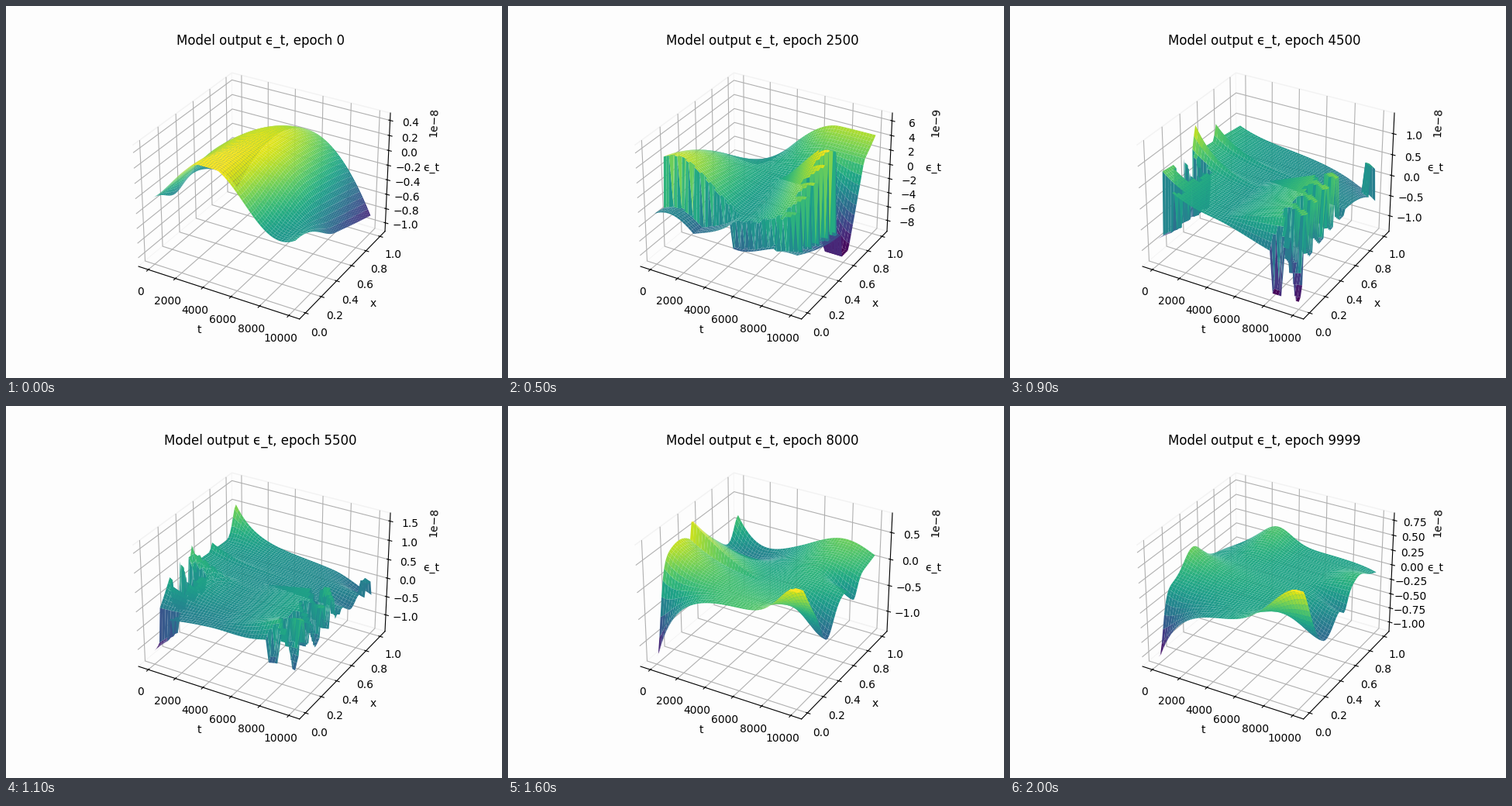
A matplotlib script that plays this animation: 640 px wide and 480 px high, repeating every 2.1 s.

```python
import numpy as np
import matplotlib.pyplot as plt
from matplotlib.animation import FuncAnimation

FRAMES, STEP_MS = 21, 100
BACK = "#fdfdfd"
PAD = 0.0729  # axis margin as a share of the data range

t, x = np.meshgrid(np.linspace(0, 1, 51), np.linspace(0, 1, 51))


def bump(a, centre, width):
    return np.exp(-((a - centre) / width) ** 2)


def decay(a, length):
    return np.exp(-a / length)


def ramp(a, start, end):
    return np.clip((a - start) / (end - start), 0, 1)


def ease(a, start, end):
    f = ramp(a, start, end)
    return f * f * (3 - 2 * f)


def past(a, edge, b, teeth=24, depth=0.03):
    """True where a lies beyond a toothed edge running along b."""
    return a > edge + depth * ((b * teeth) % 1)


def stripes(period, slant=0.0, share=0.5):
    return ((x + slant * t) / period) % 1 < share


# Each shape gives the surface on a scale from -1 to 1.

def arch():
    front = 0.55 + 0.5 * np.cos(2 * np.pi * (t - 0.4))
    top = 0.45 + 0.07 * x**4
    dome = 0.97 - 0.42 * x**4 - (3.4 + 2.4 * x) * (t - top) ** 2
    w = ease(x, 0, 0.5)
    return front + (dome - front) * w - 0.28 * bump(x, 0.25, 0.15) * decay(t, 0.12)


def split():
    z = (0.3 - 1.15 * x**1.3) * ramp(t, 0.6, 0)
    z += 0.4 * bump(x, 0.75, 0.25) * bump(t, 0.5, 0.18)
    z -= 0.22 * (1 - x) * bump(t, 0.7, 0.2)
    z += (0.14 + 0.9 * x) * t**6
    z -= 0.8 * ramp(t, 0.3, 0) * ~past(x, 0.12, t)
    z += 1.25 * ramp(t, 0.5, 0) * past(x, 0.6, t, 22, 0.04)
    z -= (0.45 + 1.95 * x) * (past(t, 0.945, x, 20) & (x < 0.67))
    return z


def saddle():
    near = x < 0.575
    z = (0.95 - 1.3 * x**1.6) * bump(t, 0.1, 0.33) - 0.08
    z += 0.85 * ease(t, 0.1, 0.75) * x**2.5
    z -= 0.95 * ramp(t, 0.55, 0.28) * ~past(x, 0.10, t, 14)
    ridge = (0.45 + 0.9 * x) * ease(t, 0.5, 0.95)
    edge = (0.5 + 2.0 * x) * past(t, 0.85, x, 9, 0.13)
    pit = 2 * ramp(x, 0.85, 0.55) * ease(t, 0.7, 1)
    z += np.where(near, ridge - edge, -pit)
    z -= 0.45 * ((t > 0.55) & (t < 0.85) & ~past(x, 0.02, t, 20, 0.05))
    return z


def shards():
    z = (0.55 - 0.3 * x) * decay(t, 0.22)
    z -= 0.3 * (1 - x) ** 2 * ease(t, 0.4, 1) + 0.5 * x**5 * t**4
    z += 0.5 * bump(x, 0.46, 0.03) * decay(t, 0.15)
    z += 0.3 * bump(x, 0.7, 0.02) * decay(t, 0.2)
    gap = (x < 0.08) | ((x > 0.19) & (x < 0.41) & stripes(0.11, 0.7, 0.75))
    z -= 1.2 * decay(t, 0.25) * (gap & ~past(t, 0.10, x, 15, 0.06))
    near = x < 0.58
    z += 0.75 * ramp(t, 0.45, 1) * ramp(x, 0, 0.08) * near
    z -= 0.85 * (past(t, 0.8, x, 13, 0.06) & near & stripes(0.13, 0.8))
    z += 0.6 * ((t > 0.95) & (x > 0.9) & (x < 0.99))
    return z


def horns():
    z = -0.07 - 1.05 * decay(t, 0.25) * bump(x, 0, 0.15 + 0.3 * t)
    z += 0.5 * bump(x, 0.28, 0.1 + 0.2 * t) * decay(t, 0.2)
    z += 1.15 * decay(t, 0.14) * bump(x, 1, 0.06 + 0.4 * t)
    z += 0.5 * bump(x, 0.03, 0.13) * bump(t, 0.93, 0.2)
    wave = 1 + np.cos(2 * np.pi * (x - 0.24) / 0.235)
    z -= 0.17 * wave * ease(t, 0.72, 1) * ramp(x, 0.1, 0.2)
    z += 0.2 * ramp(t, 0.35, 0) * (stripes(0.05, 0.9) & (x > 0.36) & (x < 0.52))
    z += 0.25 * (past(t, 0.88, x, 13, 0.06) & (x > 0.43) & (x < 0.55))
    return z


def corners(pull, lift, spread):
    """Sink at the near left corner, peak at the near right one."""
    return (lift * bump(t, 1, spread) * bump(x, 0, 0.14)
            - pull * decay(t, 0.15) * bump(x, 0, 0.08 + 0.3 * t))


def cliff():
    z = 0.1 + 0.33 * bump(x, 0, 0.3) + corners(1.65, 0.65, 0.17)
    z += 0.62 * bump(x, 0.33, 0.26) * decay(t, 0.3)
    z += 0.4 * ramp(t, 0.5, 0) * ramp(x, 1.1, 0.4) * (x > 0.43)
    z += 0.5 * bump(x, 1, 0.08) * decay(t, 0.13)
    z -= 0.35 * bump(x, 0.92, 0.18) * bump(t, 0.15, 0.25)
    z += 0.45 * bump(t, 0.8, 0.3) * x**2
    rim = 0.6 * bump(x, 0.37, 0.11) + 0.35 * bump(x, 0.72, 0.06)
    return z - rim * ease(t, 0.72, 1)


def calm():
    z = 0.16 + corners(1.25, 0.9, 0.26)
    z += 0.4 * bump(x, 0.42, 0.14) * decay(t, 0.2)
    z -= 0.3 * x**4 * decay(t, 0.12)
    z += 0.3 * bump(t, 0.28, 0.15) * bump(x, 1, 0.25)
    rim = 0.48 * bump(x, 0.33, 0.16) + 0.25 * bump(x, 0.57, 0.05)
    rim -= 0.17 * bump(x, 0.76, 0.12)
    return z - rim * ease(t, 0.72, 1) - 0.1 * x**8 * t**8


# epoch, z limits in units of 1e-9, surface
KEYS = [
    (0, -11.2, 4.97, arch()),
    (1000, -7.4, 7.55, split()),
    (2500, -9.58, 7.05, saddle()),
    (4500, -13.9, 14.87, shards()),
    (6500, -15.2, 19.3, horns()),
    (8000, -13.95, 8.6, cliff()),
    (9999, -11.65, 8.7, calm()),
]


def state(epoch):
    """Blend the two neighbouring keys: z limits and surface."""
    a, b = next(p for p in zip(KEYS, KEYS[1:]) if epoch <= p[1][0])
    f = (epoch - a[0]) / (b[0] - a[0])
    lo, hi, z = (p + (q - p) * f for p, q in zip(a[1:], b[1:]))
    return lo * 1e-9, hi * 1e-9, np.clip(z, -1, 1)


fig = plt.figure(figsize=(6.4, 4.8), dpi=100, facecolor=BACK)
ax = fig.add_subplot(projection="3d", facecolor=BACK)
for axis in (ax.xaxis, ax.yaxis, ax.zaxis):
    axis.pane.set_alpha(1)
    axis.pane.set_facecolor(BACK)
    axis.pane.set_edgecolor("#f2f2f2")
ax.set_xlabel("t")
ax.set_ylabel("x")
ax.set_zlabel("ϵ_t")


def draw(i):
    epoch = min(500 * i, 9999)
    lo, hi, z = state(epoch)
    mid, half = (lo + hi) / 2, (hi - lo) / 2 / (1 + 2 * PAD)
    for surf in list(ax.collections):
        surf.remove()
    ax.plot_surface(t * 10000, x, mid + half * z, cmap="viridis",
                    vmin=mid - half, vmax=mid + half, rstride=1, cstride=1)
    ax.set_xlim(-PAD * 10000, (1 + PAD) * 10000)
    ax.set_ylim(-PAD, 1 + PAD)
    ax.set_zlim(lo, hi)
    ax.set_title(f"Model output ϵ_t, epoch {epoch}")


anim = FuncAnimation(fig, draw, frames=FRAMES, interval=STEP_MS,
                     repeat=True, repeat_delay=0)
plt.show()
```
